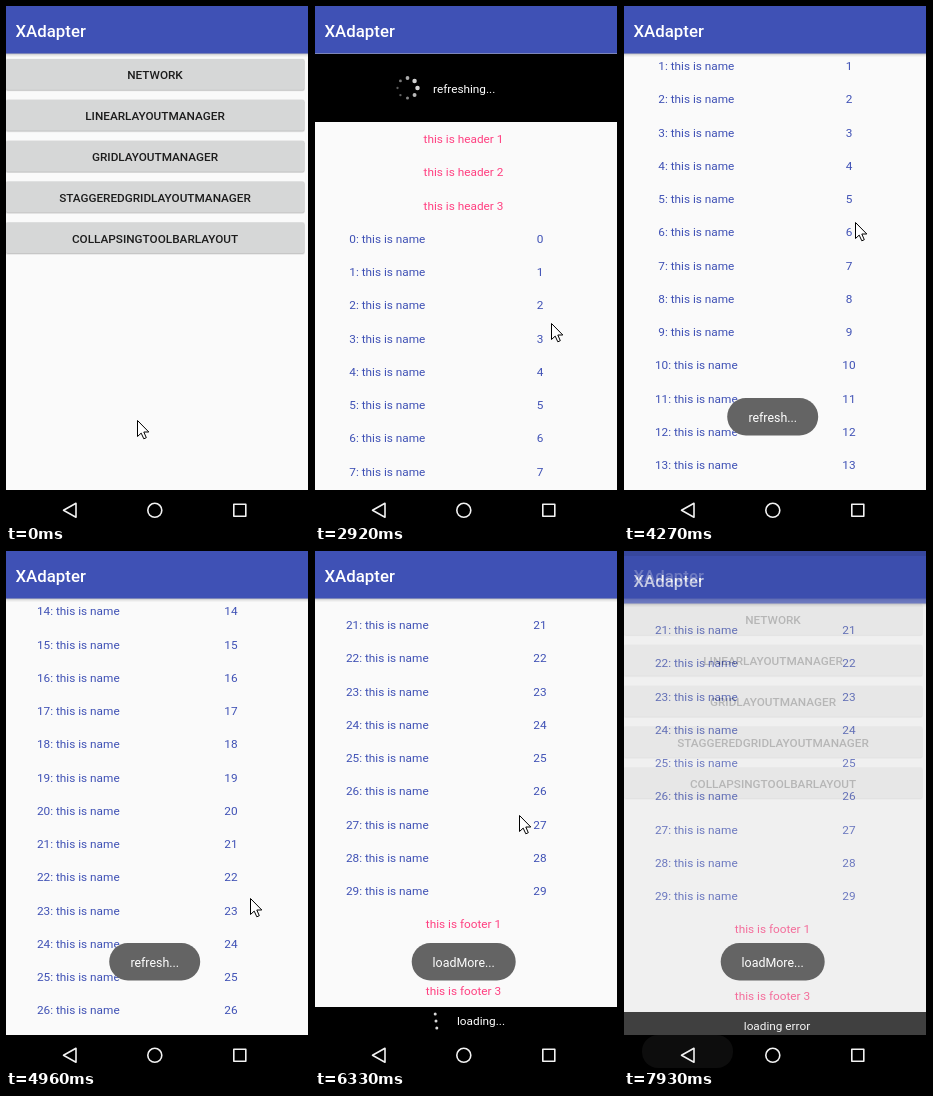
Animation of 303x517 px, one loop 8 s. Source, as an HTML page:

```html
<!DOCTYPE html>
<html lang="en">
<head>
<meta charset="utf-8">
<title>XAdapter demo</title>
<style>
  html, body { margin: 0; width: 100%; height: 100%; overflow: hidden; background: #000; }
  svg { display: block; width: 100%; height: 100%; }
  text { font: 11.8px Roboto, sans-serif; white-space: pre; }
  .title { font-size: 16.8px; font-weight: 500; }
  .button { font-size: 11.75px; font-weight: 500; }
  .toast { font-size: 12.4px; }
</style>
</head>
<body>
<svg id="stage" viewBox="0 0 303 517"></svg>
<script>
const LOOP = 8000, TICK = 136.5;
const BLUE = '#3f51b5', PINK = '#ff4081', PAPER = '#fafafa';
const TOP = 48, BOTTOM = 484, ROW = 33.25, ITEMS = 30;

// Keyframes: [tick, value, ...], linear in between.
const CURSOR = [
  [1, 131, 414], [4, 165, 265], [5, 165, 265], [12, 137, 111], [14, 137, 107],
  [17, 205, 170], [20, 236, 318], [22, 236, 316], [27, 234, 354], [31, 231, 216],
  [32, 233, 190], [35, 246, 390], [38, 239, 260], [41, 237, 217], [43, 234, 215],
  [45, 222, 231], [53, 75, 498], [54, 68, 503], [55, 66, 504], [57, 62, 522]
];
const SCREEN_OPACITY = [[14, 0], [15, .4], [16, .95], [17, 1], [57, 1], [58, .7]];
const SCREEN_SHIFT = [[14, 38], [15, 24], [16, 8], [17, 0], [56, 0], [57, 1], [58, 5]];
const HOME_DIM = [[56, 0], [58, .13]];
const PRESS = [[12, 0], [14, .12]];
const PULL = [[17, 0], [18, 25], [19, 60], [20, 78], [21, 68], [25, 68], [27, 0]];
const SCROLL = [[27, 0], [31, 138], [32, 185], [34, 270], [35, 410], [36, 570], [37, 720], [38, 789]];
const GLOW = [[37, 0], [38, .3], [41, 1], [44, 0]];
const REFRESH_TOAST = [[22, 0], [25, 1], [40, 1], [41, .65], [43, 0]];
const LOAD_TOAST = [[43, 0], [46, 1], [52, 1], [53, .86], [54, 1]];
const BACK_RIPPLE = [[53, 0], [55, 1]];

function track(keys, tick) {
  const next = keys.findIndex(key => key[0] > tick);
  if (next === 0) return keys[0].slice(1);
  if (next < 0) return keys.at(-1).slice(1);
  const a = keys[next - 1], b = keys[next];
  const part = (tick - a[0]) / (b[0] - a[0]);
  return a.slice(1).map((v, i) => v + (b[i + 1] - v) * part);
}

const rect = (x, y, w, h, fill, extra = '') =>
  `<rect x="${x}" y="${y}" width="${w}" height="${h}" fill="${fill}" ${extra}/>`;
const label = (x, y, str, fill, cls = '', anchor = 'middle') =>
  `<text x="${x}" y="${y}" fill="${fill}" class="${cls}" text-anchor="${anchor}">${str}</text>`;
const dot = (x, y, r, opacity) =>
  `<circle cx="${x}" cy="${y}" r="${r}" fill="#fff" opacity="${opacity}"/>`;
const group = (body, opacity, shift = 0) =>
  opacity > 0 ? `<g opacity="${opacity}" transform="translate(0 ${shift})">${body}</g>` : '';

const toolbar = () =>
  [.24, .14, .07, .03].map((o, i) => rect(0, 47 + i, 303, 1, '#000', `opacity="${o}"`)).join('') +
  rect(0, 0, 303, 47.5, BLUE) + label(9.5, 31, 'XAdapter', '#fff', 'title', 'start');

function home(tick) {
  const names = ['NETWORK', 'LINEARLAYOUTMANAGER', 'GRIDLAYOUTMANAGER',
    'STAGGEREDGRIDLAYOUTMANAGER', 'COLLAPSINGTOOLBARLAYOUT'];
  const buttons = names.map((name, i) => {
    const y = 53 + i * 40.85;
    const pressed = i === 1 && tick < 20 ? track(PRESS, tick)[0] : 0;
    return rect(-1, y - .3, 300, 32.6, '#000', 'rx="2" opacity=".08"') +
      rect(0, y + .5, 298.4, 31.2, '#000', 'rx="2" opacity=".14"') +
      rect(0, y, 298, 30.7, '#d6d7d7', 'rx="1.7"') +
      rect(0, y, 298, 30.7, '#000', `rx="1.7" opacity="${pressed}"`) +
      label(149, y + 20.1, name, '#1c1c1c', 'button');
  });
  return rect(0, 0, 303, BOTTOM, PAPER) + buttons.join('') + toolbar() +
    rect(0, 0, 303, BOTTOM, '#000', `opacity="${track(HOME_DIM, tick)[0]}"`);
}

function refreshHeader(tick, height) {
  if (!height) return '';
  const y = TOP + height - 34, phase = (tick - 21) * .9 - .3;
  let out = rect(0, TOP, 303, height, '#000') + label(118, y + 4.5, 'refreshing...', '#fff', '', 'start');
  for (let i = 0; i < 8; i++) {
    const angle = i * Math.PI / 4, light = .5 + .5 * Math.cos(angle - phase);
    out += dot(92.5 + 10 * Math.cos(angle), y + 10 * Math.sin(angle), 1.1 + 1.2 * light, .35 + .5 * light);
  }
  return out;
}

function loadingBar(tick, y) {
  const bar = rect(0, y, 303, 40, '#000');
  if (tick >= 47) return bar + label(153, y + 18.3, 'loading error', '#fff');
  const angle = .6 + (tick - 41) * .8;
  const balls = [-1, 0, 1].map(i =>
    dot(121 + i * 7 * Math.cos(angle), y + 14 + i * 7 * Math.sin(angle), 1.5, .85));
  return bar + balls.join('') + label(142, y + 18.3, 'loading...', '#fff', '', 'start');
}

function list(tick) {
  const [pull] = track(PULL, tick), [scroll] = track(SCROLL, tick), [glow] = track(GLOW, tick);
  let out = rect(0, 0, 303, BOTTOM, PAPER) + refreshHeader(tick, pull);
  for (let i = 0; i < ITEMS + 6; i++) {
    const y = TOP + pull + 21.2 + i * ROW - scroll, item = i - 3;
    if (y < 30 || y > 510) continue;
    if (item < 0) out += label(148.5, y, `this is header ${i + 1}`, PINK);
    else if (item >= ITEMS) out += label(148.5, y, `this is footer ${item - ITEMS + 1}`, PINK);
    else out += label(72.3, y, `${item}: this is name`, BLUE) + label(225, y, item, BLUE);
  }
  if (tick >= 38) out += loadingBar(tick, TOP + (ITEMS + 6) * ROW - scroll);
  if (glow) {
    const edge = BOTTOM - 29 * glow;
    out += `<path d="M0 ${BOTTOM}V${edge}Q151 ${edge - 46 * glow} 303 ${edge}V${BOTTOM}Z" fill="${BLUE}" opacity="${.42 * glow}"/>`;
  }
  return out + toolbar();
}

const toast = (str, width, opacity) => group(
  rect(148.7 - width / 2, 392, width, 37.5, '#646464', 'rx="18.7"') +
  label(148.7, 415.5, str, '#fff', 'toast'), opacity);

const navigation = tick =>
  rect(0, BOTTOM, 303, 33, '#000') +
  rect(18, BOTTOM, 91, 33, '#0d0d0d', `rx="16" opacity="${track(BACK_RIPPLE, tick)[0]}"`) +
  `<g fill="none" stroke="#f2f2f2" stroke-width="1.6" stroke-linejoin="round">
    <path d="M57.5 504.3L70 497.3V511.3Z"/><circle cx="148.8" cy="504.3" r="7"/>
    <rect x="227.8" y="498.3" width="12" height="12"/></g>`;

function cursor(tick) {
  const [x, y] = track(CURSOR, tick).map(Math.round);
  return `<path transform="translate(${x + .5} ${y + .5})" fill="#fff" stroke="#000"
    d="M0 0V16L3.7 12.6L6.3 18.3L8.8 17.2L6.3 11.5H11.3Z"/>`;
}

const scene = tick =>
  home(tick) +
  group(list(tick), track(SCREEN_OPACITY, tick)[0], track(SCREEN_SHIFT, tick)[0]) +
  toast('refresh...', 91, track(REFRESH_TOAST, tick)[0]) +
  toast('loadMore...', 104, track(LOAD_TOAST, tick)[0]) +
  navigation(tick) + cursor(tick) + rect(302, 0, 1, 517, '#000');

const stage = document.getElementById('stage');
let shown = -1;
function play() {
  const tick = Math.floor(performance.now() % LOOP / TICK);
  if (tick !== shown) stage.innerHTML = scene(shown = tick);
  requestAnimationFrame(play);
}
play();
</script>
</body>
</html>
```
